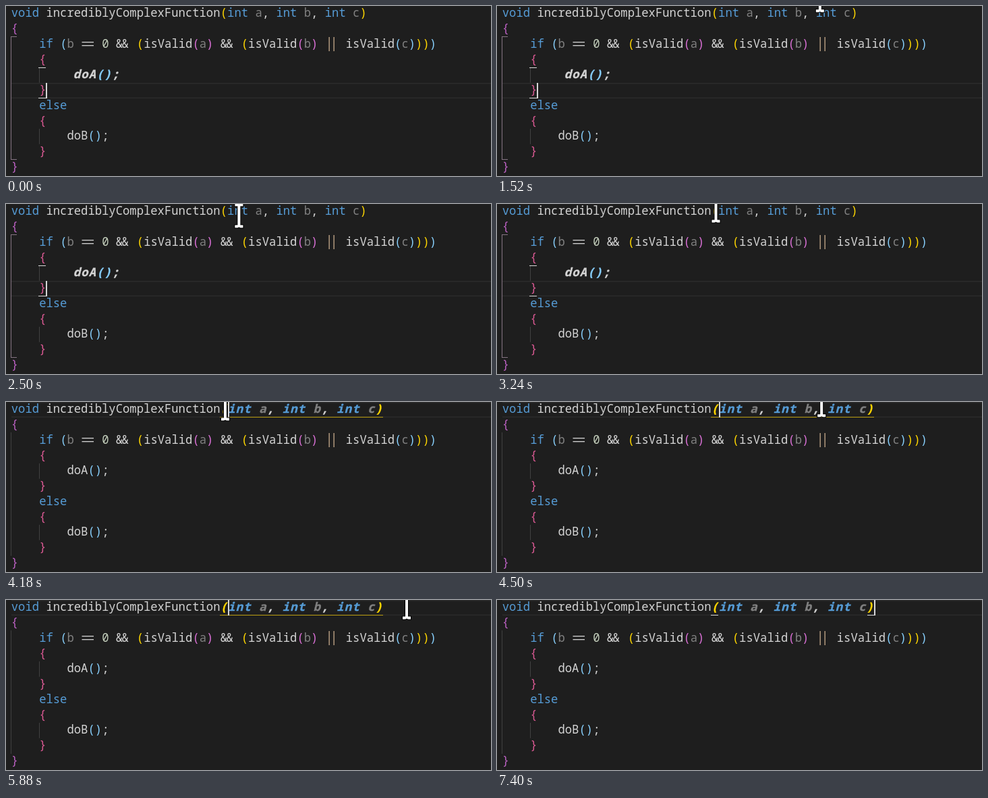
These frames come from a looping animation (719x252 px, 8 s). An HTML page:

```html
<!DOCTYPE html>
<html lang="en">
<head>
<meta charset="utf-8">
<title>Bracket scope highlighting</title>
<style>
  html, body { margin: 0; width: 100%; height: 100%; overflow: hidden; background: #1e1e1e; }
  svg { display: block; width: 719px; height: 252px; }
  text { font: 17.22px "Noto Sans Mono", "DejaVu Sans Mono", monospace; white-space: pre; }
  .strong { font-weight: 700; font-style: italic; stroke-width: .35px; }
</style>
</head>
<body>
<svg id="stage" viewBox="0 0 719 252"></svg>
<script>
const LOOP = 8000;
const LEFT = 7.8, CELL = 10.333, WIDE = 11.5, LINE = 22.75, BASE = 16.3;
const COLORS = {
  k: '#569cd6', w: '#d4d4d4', p: '#808080', n: '#c5d0bd',
  g: '#ffd700', o: '#da70d6', s: '#87cefa', r: '#dc5a94', v: '#bd62c4'
};
const MAUVE = '#857483', WHITE = '#d8d8d8', GUIDE = '#404040';
const stage = document.getElementById('stage');

function add(parent, tag, attrs = {}) {
  const node = document.createElementNS('http://www.w3.org/2000/svg', tag);
  for (const key in attrs) node.setAttribute(key, attrs[key]);
  parent.append(node);
  return node;
}
const group = () => add(stage, 'g');
const rect = (parent, x, y, width, height, fill) =>
  add(parent, 'rect', { x, y, width, height, fill });
const show = (node, on) => node.setAttribute('visibility', on ? 'visible' : 'hidden');

// Each mask letter picks the colour of the character above it; blanks are skipped.
function code(parent, line, col, chars, mask, x0 = LEFT, strong = false) {
  const pitch = strong ? WIDE : CELL;
  const text = add(parent, 'text', { y: line * LINE + BASE });
  if (strong) {
    text.setAttribute('class', 'strong');
    text.setAttribute('letter-spacing', WIDE - CELL);
  }
  for (const run of mask.matchAll(/(\w)\1*/g)) {
    const fill = COLORS[run[1]];
    const span = add(text, 'tspan', { x: x0 + (col + run.index) * pitch, fill });
    if (strong) span.setAttribute('stroke', fill);
    span.textContent = chars.substr(run.index, run[0].length);
    if (span.textContent === '&&') span.setAttribute('letter-spacing', -1.5);
  }
}

// Current line border
const lineBox = group();
for (const y of [0, 21.5]) rect(lineBox, 8, y, 711, 1.5, '#2b2b2b');

// Indent guides
for (const line of [4, 8]) rect(stage, 49, line * LINE, 1, LINE, GUIDE);
const outerGuide = rect(stage, 7, 45, 1, 183, GUIDE);

// Scope marks around the braces
const braceScope = group();
rect(braceScope, 7, 45, 1, 183, MAUVE);
for (const y of [45, 227]) rect(braceScope, 7, y, 9, 1, MAUVE);
for (const y of [91, 136]) rect(braceScope, 48, y, 11, 1, WHITE);

// Scope marks around the parameter list
const goldLine = rect(stage, 317, 22, 242, 1, '#b99b10');
const parenTicks = group();
for (const x of [317, 549]) rect(parenTicks, x, 22, 11, 1, WHITE);

// Source text
code(stage, 0, 0, 'void incrediblyComplexFunction', 'kkkk ' + 'w'.repeat(25));
const params = '(int a, int b, int c)', paramMask = 'gkkk pw kkk pw kkk pg';
const plainParams = group(), strongParams = group();
code(plainParams, 0, 30, params, paramMask);
code(strongParams, 0, 0, params, paramMask, LEFT + 30 * CELL, true);

code(stage, 1, 0, '{', 'v');
code(stage, 2, 4,
  'if (b == 0 && (isValid(a) && (isValid(b) || isValid(c))))',
  'kk sp    n ww gwwwwwwwopo ww gwwwwwwwopo    wwwwwwwspsggs');
// Joined operators
for (const y of [53, 58]) rect(stage, 112.5, y, 17.5, 1.3, COLORS.w);
for (const x of [478.5, 485.5]) rect(stage, x, 46, 1.3, 21, '#c8ab8c');

code(stage, 3, 4, '{', 'r');
const plainCall = group(), strongCall = group();
code(plainCall, 4, 8, 'doA();', 'wwwssw');
code(strongCall, 4, 8, 'doA();', 'wwwssw', LEFT, true);
code(stage, 5, 4, '}', 'r');
code(stage, 6, 4, 'else', 'kkkk');
code(stage, 7, 4, '{', 'r');
code(stage, 8, 8, 'doB();', 'wwwssw');
code(stage, 9, 4, '}', 'r');
code(stage, 10, 0, '}', 'v');

const caret = rect(stage, 0, 0, 2, 23, WHITE);

// I-beam pointer; its origin is the middle of the lower edge
const pointer = add(stage, 'path', {
  d: 'M-6-35H-2L0-34 2-35H6V-31H2V-3H6V1H2L0 0-2 1H-6V-3H-2V-31H-6Z',
  fill: '#fff', stroke: '#000', 'stroke-width': 2, 'paint-order': 'stroke'
});

const ENTER = 1520, CLICK = 3940, RESTYLE = 4180, CLICK_END = 6600, LEAVE = 6880;
const caretOff = [[860, ENTER], [3220, CLICK], [4880, 5400], [CLICK_END, 6700], [LEAVE, 7400]];

// Straight moves with an optional sag: each starts where the last one stopped.
const moves = [
  { from: ENTER, to: 2220, x: 350, y: 36, sag: 21 },
  { from: 2400, to: 2960, x: 324.5, y: 26.5, sag: 0 },
  { from: RESTYLE, to: 4640, x: 549, y: 19, sag: 0 },
  { from: 5040, to: 5440, x: 594, y: 27.5, sag: 14 },
  { from: LEAVE, to: 7260, x: 730, y: 24, sag: 0 }
];

function pointerAt(t) {
  let x = 479, y = 8;
  for (const move of moves) {
    const f = Math.min(1, Math.max(0, (t - move.from) / (move.to - move.from)));
    x += (move.x - x) * f;
    y += (move.y - y) * f + move.sag * Math.sin(Math.PI * f);
    if (f < 1) break;
  }
  return [x, y];
}

function draw(t) {
  const moved = t >= CLICK, restyled = t >= RESTYLE, left = t >= LEAVE;
  lineBox.setAttribute('transform', `translate(0 ${moved ? 0 : 114})`);
  show(braceScope, !moved);
  show(outerGuide, moved);
  show(goldLine, moved && !left);
  goldLine.setAttribute('width', restyled ? 242 : 212);
  show(parenTicks, left);
  show(plainParams, !restyled);
  show(strongParams, restyled);
  show(strongCall, !restyled);
  show(plainCall, restyled);

  caret.setAttribute('x', !moved ? 59 : t < CLICK_END ? 329 : 559);
  caret.setAttribute('y', moved ? 0 : 114);
  show(caret, !caretOff.some(([from, to]) => t >= from && t < to));

  show(pointer, t >= ENTER);
  pointer.setAttribute('transform', `translate(${pointerAt(t)})`);
}

const start = performance.now();
function tick() {
  draw((performance.now() - start) % LOOP);
  requestAnimationFrame(tick);
}
tick();
</script>
</body>
</html>
```
